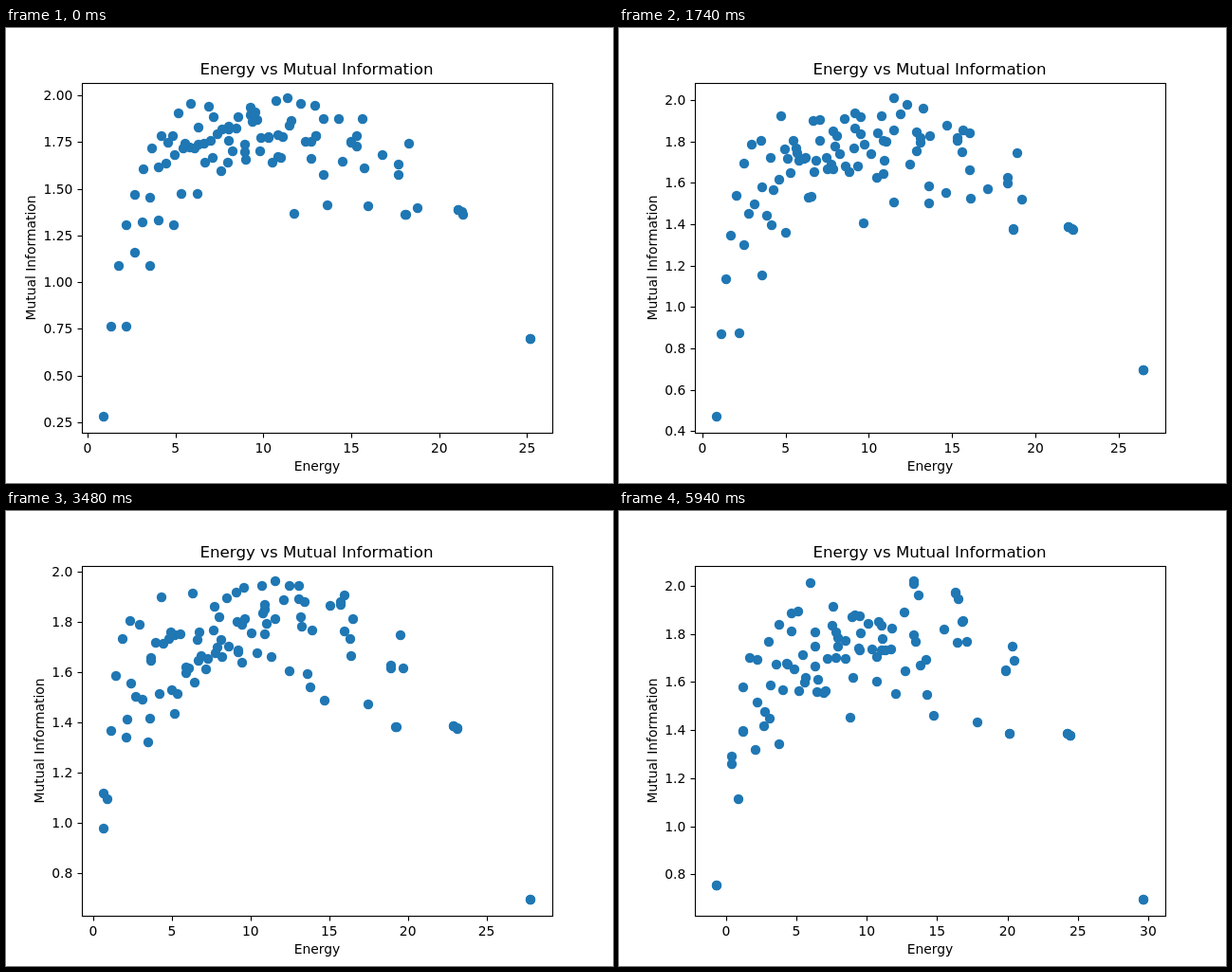
An HTML page that plays this animation: 640x480 px, repeating every 6 s.

```html
<!DOCTYPE html>
<html lang="en">
<head>
<meta charset="utf-8">
<title>Energy vs Mutual Information</title>
<style>
  html, body { margin: 0; width: 100%; height: 100%; overflow: hidden; background: #fff; }
  svg { display: block; width: 640px; height: 480px; }
  text { font: 13.889px "DejaVu Sans", sans-serif; text-anchor: middle; }
  .title { font-size: 16.667px; }
  .y { text-anchor: end; }
  .line { fill: none; stroke: #000; stroke-width: 1.111; }
  .dots { fill: #1f77b4; }
</style>
</head>
<body>
<svg viewBox="0 0 640 480">
  <g id="plot"></g>
  <rect class="line" x="80.5" y="58.5" width="496" height="369"/>
  <text class="title" x="327.5" y="49">Energy vs Mutual Information</text>
  <text x="328" y="467">Energy</text>
</svg>
<script>
// Entanglement spectrum of two coupled oscillators, each cut off at LEVELS states.
const LEVELS = 10, STEPS = 100, STEP_MS = 60;
const LEFT = 80, RIGHT = 576, TOP = 57.6, BOTTOM = 427.2;
const plot = document.getElementById('plot');

const range = (n, f) => Array.from({ length: n }, (_, i) => f(i));
const square = (n, f) => range(n, i => range(n, j => f(i, j)));

// Cyclic Jacobi diagonalisation; eigenvectors are the columns of vecs.
function eigen(a) {
  const n = a.length, vecs = square(n, (i, j) => +(i === j));
  for (let sweep = 0; sweep < 40; sweep++) {
    let off = 0;
    for (let p = 0; p < n; p++) {
      for (let q = p + 1; q < n; q++) {
        const apq = a[p][q];
        off += apq * apq;
        if (Math.abs(apq) < 1e-15) continue;
        const th = (a[q][q] - a[p][p]) / (2 * apq);
        const t = (th < 0 ? -1 : 1) / (Math.abs(th) + Math.sqrt(th * th + 1));
        const c = 1 / Math.sqrt(t * t + 1), s = t * c;
        for (let k = 0; k < n; k++) {
          const row = a[k], x = row[p], y = row[q];
          row[p] = c * x - s * y;
          row[q] = s * x + c * y;
          const v = vecs[k], vx = v[p], vy = v[q];
          v[p] = c * vx - s * vy;
          v[q] = s * vx + c * vy;
        }
        const rp = a[p], rq = a[q];
        for (let k = 0; k < n; k++) {
          const x = rp[k], y = rq[k];
          rp[k] = c * x - s * y;
          rq[k] = s * x + c * y;
        }
      }
    }
    if (off < 1e-22) break;
  }
  return { vals: a.map((row, i) => row[i]), vecs };
}

// Position operator in the number basis.
const pos = (a, b) => Math.abs(a - b) === 1 ? Math.sqrt(Math.max(a, b) / 2) : 0;

function entropy(m) {
  const rho = square(LEVELS, (i, j) => m[i].reduce((sum, x, k) => sum + x * m[j][k], 0));
  return eigen(rho).vals.reduce((sum, p) => p > 1e-14 ? sum - p * Math.log(p) : sum, 0);
}

// States of one exchange sign and one parity.
function sector(coupling, sign, parity) {
  const basis = [];
  for (let n = 0; n < LEVELS; n++)
    for (let m = n; m < LEVELS; m++)
      if ((n + m) % 2 === parity && (sign > 0 || n < m))
        basis.push({ n, m, norm: n === m ? Math.SQRT1_2 : 1 });
  const { vals, vecs } = eigen(square(basis.length, (i, j) => {
    const u = basis[i], v = basis[j];
    const xx = pos(u.n, v.n) * pos(u.m, v.m) + sign * pos(u.n, v.m) * pos(u.m, v.n);
    return coupling * u.norm * v.norm * xx + (i === j ? u.n + u.m + 1 : 0);
  }));
  return vals.map((energy, k) => {
    const m = square(LEVELS, () => 0);
    basis.forEach((b, i) => {
      const w = vecs[i][k] * Math.SQRT1_2 * b.norm;
      m[b.n][b.m] += w;
      m[b.m][b.n] += sign * w;
    });
    return { energy, info: entropy(m) };
  });
}

// Linear axis with 5% margins and at most nine tick intervals.
function axis(values, from, to) {
  let lo = Math.min(...values), hi = Math.max(...values);
  const pad = (hi - lo) * 0.05;
  lo -= pad;
  hi += pad;
  const raw = (hi - lo) / 9, mag = 10 ** Math.floor(Math.log10(raw));
  const step = mag * [1, 2, 2.5, 5, 10].find(s => s * mag >= raw);
  const ticks = [];
  for (let k = Math.ceil(lo / step); k * step <= hi; k++) ticks.push(k * step);
  const digits = step >= 1 ? 0 : Math.abs(step * 10 - Math.round(step * 10)) < 1e-9 ? 1 : 2;
  return { map: v => from + (v - lo) / (hi - lo) * (to - from), ticks, digits };
}

function draw(step) {
  const coupling = 0.8 + 0.4 * step / (STEPS - 1);
  const states = [[1, 0], [1, 1], [-1, 0], [-1, 1]].flatMap(([s, p]) => sector(coupling, s, p));
  const ax = axis(states.map(s => s.energy), LEFT, RIGHT);
  const ay = axis(states.map(s => s.info), BOTTOM, TOP);
  const dots = states.map(s =>
    `<circle cx="${Math.round(ax.map(s.energy))}" cy="${Math.round(ay.map(s.info))}" r="5.2"/>`);
  const xTicks = ax.ticks.map(v => {
    const x = ax.map(v);
    return `<path class="line" d="M${Math.round(x) + 0.5} 427.5v5"/>` +
      `<text x="${x}" y="448">${v.toFixed(ax.digits)}</text>`;
  });
  const yTicks = ay.ticks.map(v => {
    const y = Math.round(ay.map(v));
    return `<path class="line" d="M80.5 ${y + 0.5}h-5"/>` +
      `<text class="y" x="70.3" y="${y + 5}">${v.toFixed(ay.digits)}</text>`;
  });
  const labelX = ay.digits === 2 ? 31 : 40;
  return `<g class="dots">${dots.join('')}</g>${xTicks.join('')}${yTicks.join('')}` +
    `<text transform="translate(${labelX} 242.5) rotate(-90)">Mutual Information</text>`;
}

const cache = [];
let shown = -1;
function tick() {
  const step = Math.floor(performance.now() / STEP_MS) % STEPS;
  if (step !== shown) {
    plot.innerHTML = cache[step] ??= draw(step);
    shown = step;
  }
  requestAnimationFrame(tick);
}
tick();
</script>
</body>
</html>
```
